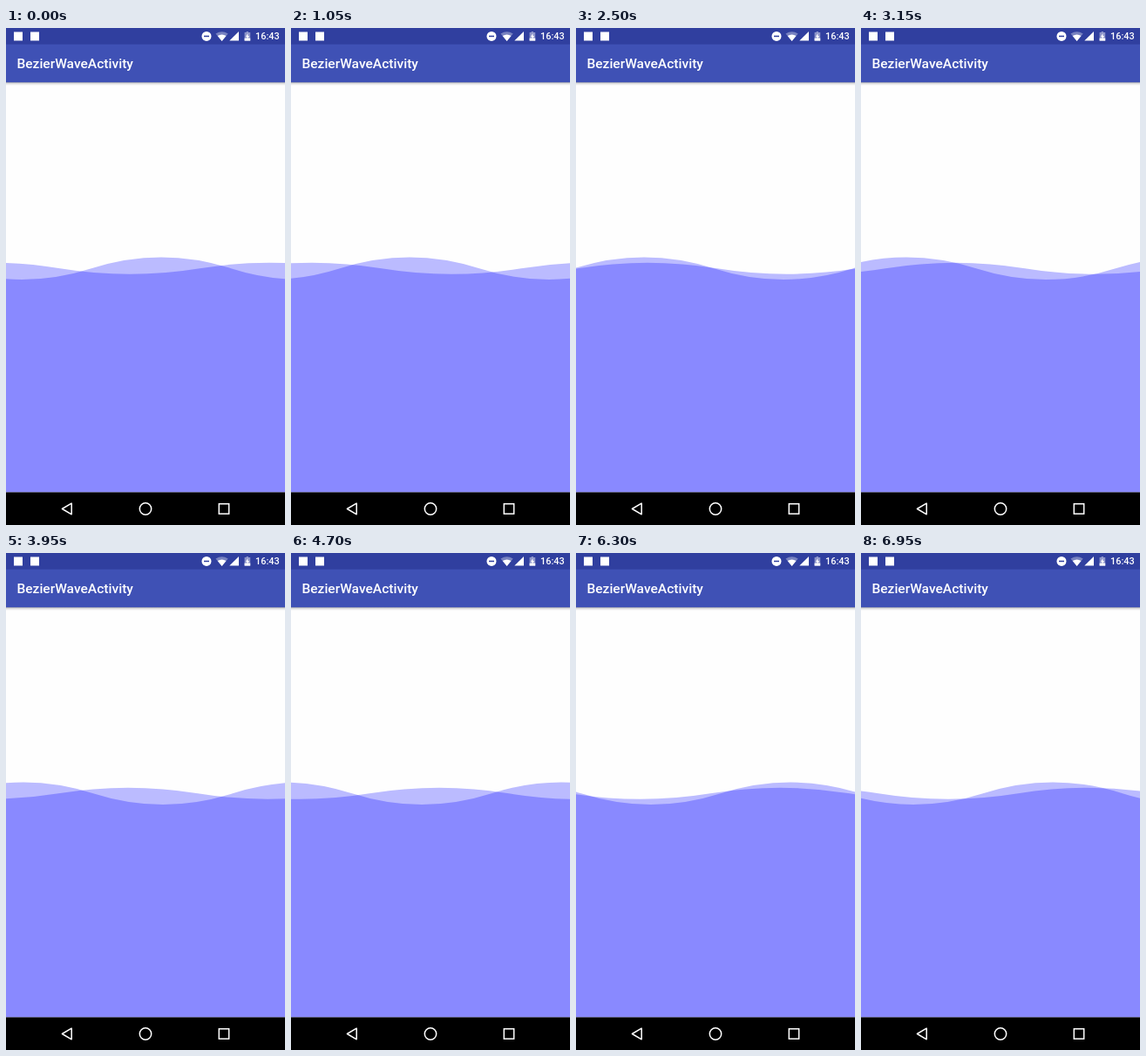
An HTML page that plays this animation: 320 by 569 pixels, repeating every 7000 ms.

```html
<!DOCTYPE html>
<html lang="en">
<head>
<meta charset="utf-8">
<title>Bezier waves</title>
<style>
  html, body { margin: 0; width: 100%; height: 100%; overflow: hidden; background: #fefefe; }
  svg { display: block; width: 100%; height: 100%; }
  text { font-family: Roboto, "Open Sans", sans-serif; font-weight: 500; fill: #fff; }
</style>
</head>
<body>
<svg viewBox="0 0 320 569">
  <defs>
    <linearGradient id="shadow" x2="0" y2="1">
      <stop stop-color="#000" stop-opacity=".34"/>
      <stop offset=".4" stop-color="#000" stop-opacity=".12"/>
      <stop offset="1" stop-color="#000" stop-opacity="0"/>
    </linearGradient>
  </defs>
  <rect width="320" height="569" fill="#fefefe"/>
  <g fill="#00f" fill-opacity=".267">
    <path id="tall"/>
    <path id="low"/>
  </g>

  <rect y="62" width="320" height="4" fill="url(#shadow)"/>
  <rect width="320" height="62.2" fill="#3f51b5"/>
  <rect width="320" height="18.7" fill="#303f9f"/>
  <text x="12.4" y="46.3" font-size="15.56">BezierWaveActivity</text>

  <g fill="#fff">
    <rect x="9" y="4.5" width="10" height="10"/>
    <rect x="28" y="4.5" width="10" height="10"/>
    <circle cx="230" cy="9.4" r="5.5"/>
    <rect x="227" y="8.7" width="6" height="1.5" fill="#303f9f"/>
    <path d="M240.5 6.6Q247.6 1.8 254.7 6.6L247.6 15Z" opacity=".35"/>
    <path d="M242.7 9.1Q247.6 5.8 252.5 9.1L247.6 15Z"/>
    <path d="M267 4V14.6H256.3Z"/>
    <path d="M275.6 4H278V5H280.2V14.6H273.6V5H275.6Z" opacity=".45"/>
    <path d="M273.6 11.6H280.2V14.6H273.6Z"/>
    <path d="M277.4 6L274.9 10.3H276.5V13.2L279 8.9H277.4Z"/>
  </g>
  <text x="313.7" y="13.3" font-size="10.9" text-anchor="end">16:43</text>

  <rect y="531.5" width="320" height="37.5"/>
  <g fill="none" stroke="#fff" stroke-width="1.5">
    <path d="M75.2 544.2V556.8L64.4 550.5Z" stroke-linejoin="round"/>
    <circle cx="160" cy="550.5" r="6.7"/>
    <rect x="244.3" y="544.8" width="11.4" height="11.4"/>
  </g>
</svg>
<script>
  const LOOP = 7000, STEP = 50, SPEED = 0.04;
  const PERIOD = 320, LEVEL = 275.25, BOTTOM = 531.5;
  const tall = document.getElementById('tall');
  const low = document.getElementById('low');

  // Quadratic half-waves; the control point sits at twice the amplitude.
  function wavePath(crest, amplitude) {
    const shift = (crest - PERIOD / 4) % PERIOD;
    const start = (shift + PERIOD) % PERIOD - PERIOD;
    const half = PERIOD / 2;
    return `M${start} ${LEVEL}q${half / 2} ${-2 * amplitude} ${half} 0` +
      `t${half} 0`.repeat(3) + `V${BOTTOM}H${start}Z`;
  }

  function draw(time) {
    const travel = SPEED * time;
    tall.setAttribute('d', wavePath(178 - travel, 12.75));
    low.setAttribute('d', wavePath(travel - 18, 6.5));
  }

  const origin = performance.now();
  function tick(now) {
    const elapsed = Math.max(0, now - origin) % LOOP;
    draw(Math.floor(elapsed / STEP) * STEP);
    requestAnimationFrame(tick);
  }
  draw(0);
  requestAnimationFrame(tick);
</script>
</body>
</html>
```
